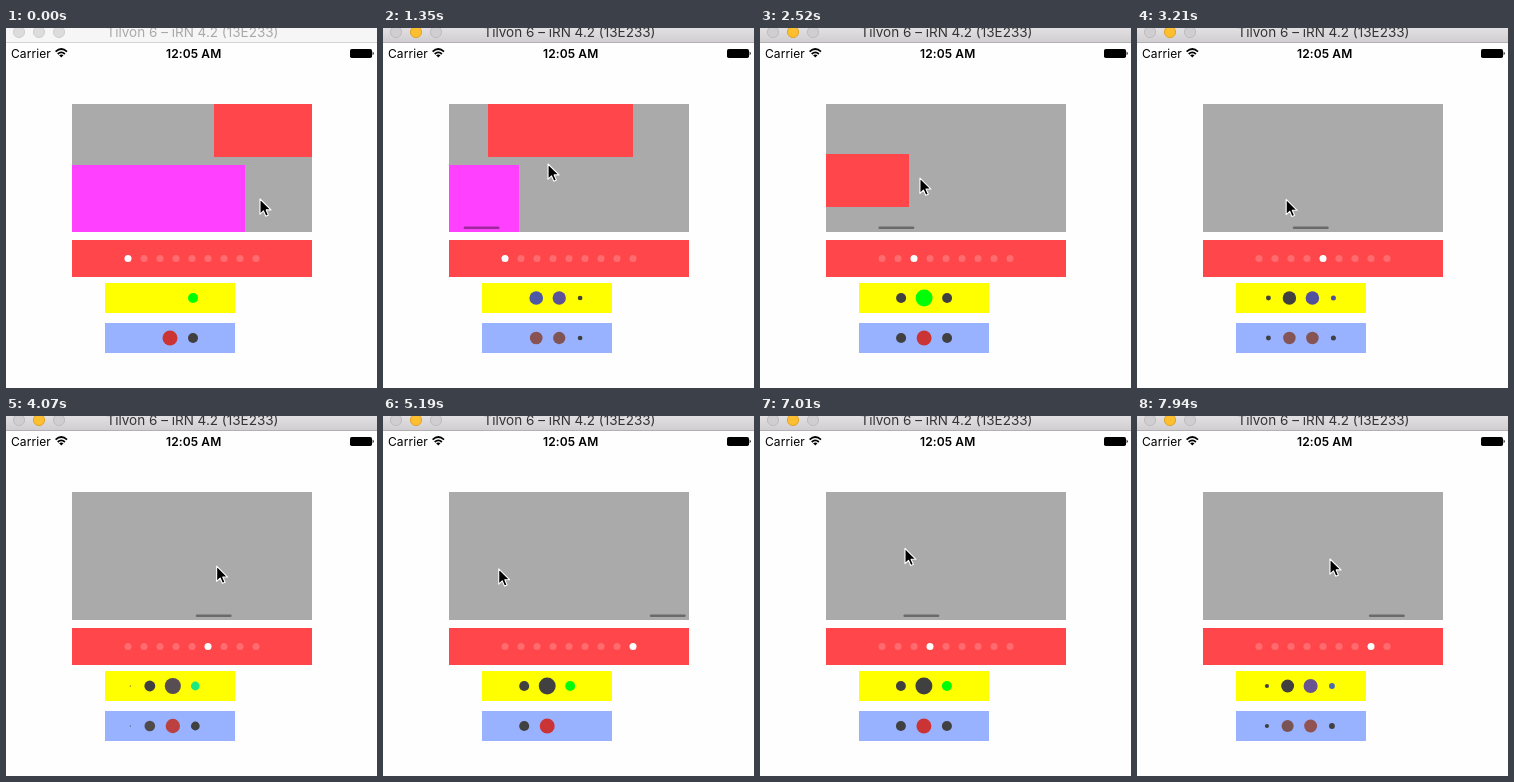
Recreate the animation shown at these times as an HTML page. Size 371 by 360 pixels, loop 7.99 s.

```html
<!DOCTYPE html>
<html>
<head>
<meta charset="utf-8">
<style>
  html, body { margin: 0; width: 100%; height: 100%; overflow: hidden; background: #fefefe; }
  svg { display: block; }
  text { font-family: Inter, "Liberation Sans", sans-serif; }
</style>
</head>
<body>
<svg width="371" height="360" viewBox="0 0 371 360">
  <defs>
    <linearGradient id="chrome" x1="0" y1="0" x2="0" y2="1">
      <stop offset="0" stop-color="#e2e0e2"/>
      <stop offset="1" stop-color="#d0ced0"/>
    </linearGradient>
    <clipPath id="view"><rect x="66" y="76" width="240" height="128"/></clipPath>
  </defs>
  <rect width="371" height="360" fill="#fefefe"/>

  <rect id="bar" width="371" height="14"/>
  <rect id="edge" y="14" width="371" height="1"/>
  <g id="lights">
    <circle cx="13" cy="4" r="5.6"/>
    <circle cx="33" cy="4" r="5.6"/>
    <circle cx="53" cy="4" r="5.6"/>
  </g>
  <text id="title" x="186.5" y="9" font-size="13.5" text-anchor="middle">Tilvon 6 – iRN 4.2 (13E233)</text>

  <text x="5" y="30" font-size="12" letter-spacing=".1">Carrier</text>
  <text x="187.7" y="30" font-size="12" font-weight="600" letter-spacing=".1" text-anchor="middle">12:05 AM</text>
  <g fill="none" stroke="#000" stroke-width="1.7">
    <path d="M49.6 23.6Q55.3 18.4 61 23.6"/>
    <path d="M51.7 26Q55.3 22.7 58.9 26"/>
    <path d="M53.1 27.2Q55.3 25.6 57.5 27.2L55.3 29.4Z" fill="#000" stroke="none"/>
  </g>
  <rect x="344" y="21" width="22" height="9" rx="1.8"/>
  <path d="M366.6 23.6Q369 25.5 366.6 27.4Z"/>

  <rect x="66" y="76" width="240" height="128" fill="#aaa"/>
  <g clip-path="url(#view)">
    <g id="content">
      <rect x="208" y="76" width="145" height="53" fill="#ff474b"/>
      <rect x="66" y="137" width="173" height="67" fill="#ff40ff"/>
      <rect x="443" y="126" width="145" height="53" fill="#ff474b"/>
    </g>
    <rect id="thumb" y="198.4" width="36" height="2.6" rx="1.3" fill="#000"/>
  </g>
  <rect x="66" y="212" width="240" height="37" fill="#ff474b"/>
  <g id="pages"></g>
  <rect x="99" y="255" width="130" height="30" fill="#ff0"/>
  <g id="upper"></g>
  <rect x="99" y="295" width="130" height="30" fill="#99b2ff"/>
  <g id="lower"></g>
  <path id="cursor" d="M0 0V15.2L3.5 11.9L5.8 17.2L8.4 16.1L6.1 10.9H11Z" stroke="#fff" stroke-width="1.1" stroke-linejoin="round"/>
</svg>
<script>
const LOOP = 7990, STEP = 220, LAST = 1760, RETURN = 450;
const $ = id => document.getElementById(id);
const clamp = (v, lo, hi) => Math.min(hi, Math.max(lo, v));
const mix = (a, b, u) => a + (b - a) * u;
const span = (t, a, b) => clamp((t - a) / (b - a), 0, 1);
const out = u => Math.sin(u * Math.PI / 2);
const inOut = u => (1 - Math.cos(u * Math.PI)) / 2;

// Drag lasts from down to up, the glide from go to stop ends at offset rest
const swipe = (down, up, go, stop, from, to, rest) => ({ down, up, go, stop, from, to, rest });
const swipes = [
  swipe(0, 0, 120, 120, [254, 171], [254, 171], 0),
  swipe(900, 1170, 1345, 2190, [266, 144], [165, 136], 352),
  swipe(2400, 2600, 2600, 3150, [247, 142], [140, 152], 664),
  swipe(3154, 3320, 3500, 4000, [256, 175], [48, 168], 1000),
  swipe(4000, 4250, 4250, 4650, [284, 148], [114, 153], LAST),
  swipe(5190, 5420, 5420, 6040, [114, 153], [364, 138], 749),
  swipe(6040, 6260, 6260, 6730, [64, 132], [250, 138], 560),
  swipe(6900, 7200, 7200, 7940, [246, 128], [62, 136], 1448),
  swipe(LOOP, LOOP, LOOP, LOOP, [193, 143], [193, 143], 1448)
];

function pose(t) {
  let i = swipes.length - 2;
  while (i > 0 && swipes[i].down > t) i--;
  const s = swipes[i], next = swipes[i + 1];
  const drag = out(span(t, s.down, s.up || 1));
  const back = inOut(span(t, s.go, Math.min(s.go + RETURN, next.down)));
  const at = n => mix(mix(s.from[n], s.to[n], drag), next.from[n], back);
  const pulled = (i ? swipes[i - 1].rest : 0) + (s.from[0] - s.to[0]) * drag;
  return {
    x: at(0), y: at(1),
    off: Math.round(mix(pulled, s.rest, span(t, s.go, s.stop))),
    shown: i ? 1 - span(t, s.stop + 150, s.stop + 400) : 0
  };
}

function hsv(h, s, v) {
  const part = n => {
    const k = (n + h / 60) % 6;
    return Math.round(255 * v * (1 - s * clamp(Math.min(k, 4 - k), 0, 1)));
  };
  return `rgb(${part(5)},${part(3)},${part(1)})`;
}
const green = m => hsv(360 - 240 * m, m, .25 + .75 * m);
const red = m => hsv(0, .75 * m, .25 + .55 * m);

function dots(id, count, y) {
  return Array.from({ length: count }, (_, k) => {
    const dot = document.createElementNS("http://www.w3.org/2000/svg", "circle");
    dot.setAttribute("cx", 122 + 16 * k);
    dot.setAttribute("cy", y);
    dot.setAttribute("r", 3.5);
    dot.setAttribute("fill", "#fff");
    return $(id).appendChild(dot);
  });
}
const pages = dots("pages", 9, 230.5);
const upper = dots("upper", 10, 270);
const lower = dots("lower", 9, 310);

// Dots shrink away from the centre; the tint peaks at position `hot`
function pager(list, s, hot, big, tint) {
  list.forEach((dot, k) => {
    const d = k - s, a = Math.abs(d);
    const x = a < 1 ? 23 * a : 23 + 19 * (a - 1);
    const size = a < 1 ? mix(big, 10, a) : 10 * Math.max(0, 2 - a);
    dot.setAttribute("cx", 164 + Math.sign(d) * x);
    dot.setAttribute("r", size / 2);
    dot.setAttribute("fill", tint(Math.max(0, 1 - Math.abs(k - hot))));
  });
}

function chrome(active) {
  $("bar").setAttribute("fill", active ? "url(#chrome)" : "#f6f6f6");
  $("edge").setAttribute("fill", active ? "#b2b0b2" : "#d4d4d4");
  $("title").setAttribute("fill", active ? "#343434" : "#a9a9a9");
  [...$("lights").children].forEach((c, i) => {
    const lit = active && i === 1;
    c.setAttribute("fill", lit ? "#fdbe2f" : active ? "#d0ced0" : "#dcdcdc");
    c.setAttribute("stroke", lit ? "#e0a52c" : active ? "#bebcbe" : "#d0d0d0");
  });
}

function draw(t) {
  const { x, y, off, shown } = pose(t);
  const s = off / STEP, page = Math.round(s), idle = t < swipes[1].down;
  chrome(!idle);
  $("content").setAttribute("transform", `translate(${-off} 0)`);
  $("thumb").setAttribute("x", 69 + 198 * off / LAST);
  $("thumb").setAttribute("opacity", .38 * shown);

  pages.forEach((p, k) => p.setAttribute("opacity", k === page ? 1 : .2));
  // The upper tint runs one dot ahead, except during the first swipe
  pager(upper, s, idle || t > swipes[2].up ? s + 1 : s, 17, green);
  upper[0].setAttribute("opacity", idle ? 0 : 1);
  pager(lower, s, s, 15, red);
  $("cursor").setAttribute("transform", `translate(${x} ${y})`);
}

const start = performance.now();
function tick(now) {
  draw(Math.max(0, now - start) % LOOP);
  requestAnimationFrame(tick);
}
draw(0);
requestAnimationFrame(tick);
</script>
</body>
</html>
```
